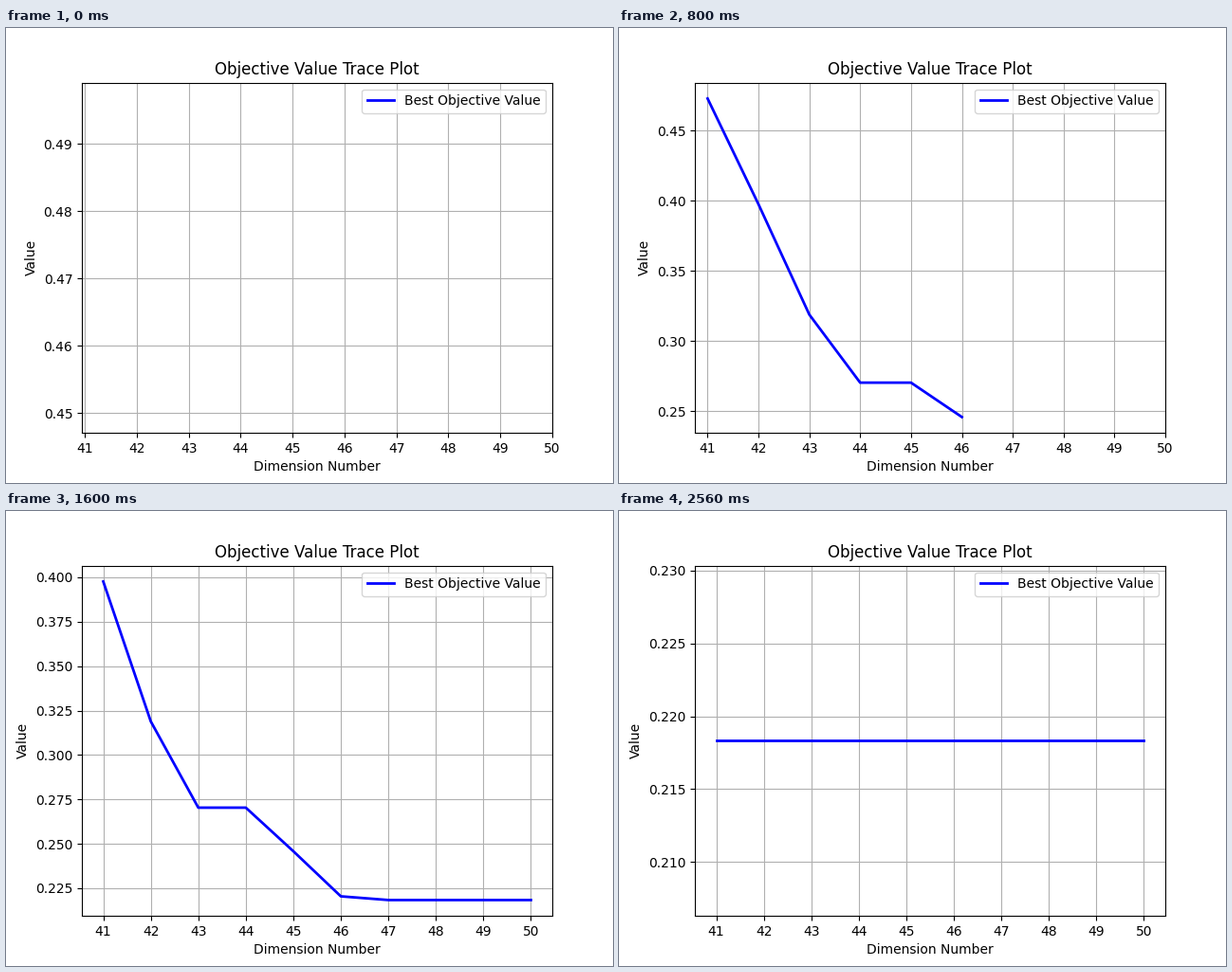
These frames come from a looping animation (640 px wide and 480 px high, 8.2 s). A matplotlib script:

```python
import matplotlib.pyplot as plt
from matplotlib.animation import FuncAnimation

WINDOW = 10          # values shown at once
FIRST_X = 41
TICK_MS = 40
TICKS_PER_STEP = 4   # a new value every 160 ms
LOOP_MS = 8200
FLOOR = 0.21832
TRACE = [0.47305, 0.39765, 0.3189, 0.27033, 0.27033, 0.2458, 0.2204] + [FLOOR] * 10

fig, ax = plt.subplots(figsize=(6.4, 4.8), dpi=100)
line, = ax.plot([], [], color="blue", lw=2, label="Best Objective Value")
ax.set_title("Objective Value Trace Plot")
ax.set_xlabel("Dimension Number")
ax.set_ylabel("Value")
ax.set_xticks(range(FIRST_X, FIRST_X + WINDOW))
ax.grid(True)
ax.legend(loc="upper right")


def x_limits(count):
    """Five percent margins, with the right edge never below the last tick."""
    span = count - 1
    pad = 0.05 * span if span else 0.055
    last = FIRST_X + WINDOW - 1
    return FIRST_X - pad, max(last, FIRST_X + span + pad)


def update(tick):
    newest = min(tick // TICKS_PER_STEP, len(TRACE) - 1)
    values = TRACE[max(0, newest + 1 - WINDOW):newest + 1]
    line.set_data(range(FIRST_X, FIRST_X + len(values)), values)
    ax.set_xlim(*x_limits(len(values)))
    ax.relim()
    ax.autoscale_view(scalex=False)
    return line,


anim = FuncAnimation(fig, update, frames=LOOP_MS // TICK_MS, interval=TICK_MS,
                     init_func=lambda: update(0), repeat=True, repeat_delay=0)
plt.show()
```
